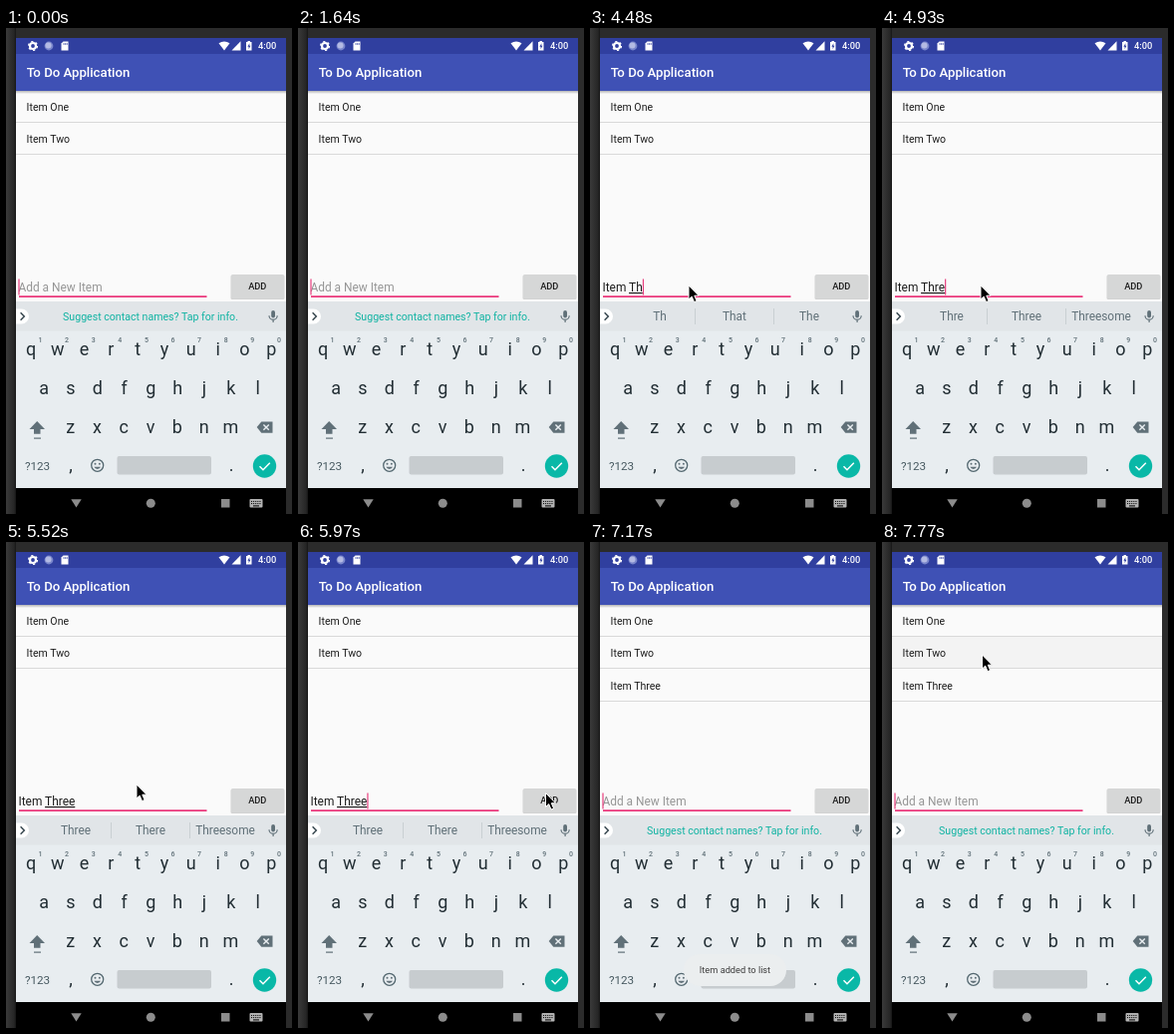
Animation of 287x487 px, one loop 8 s. Source, as an HTML page:

```html
<!DOCTYPE html>
<html lang="en">
<head>
<meta charset="utf-8">
<title>To Do Application</title>
<style>
  html, body { margin: 0; width: 100%; height: 100%; overflow: hidden; background: #2b2b2b; }
  svg { display: block; width: 287px; height: 487px; font-family: Roboto, sans-serif; }
  text { white-space: pre; }
  .mid { text-anchor: middle; }
  .medium { font-weight: 500; }
  .item { font-size: 10.55px; fill: #1c1c1c; }
  .field { font-size: 11.9px; }
  .word { font-size: 11.87px; fill: #607078; }
  .key { font-size: 18px; fill: #222e34; }
  .digit { font-size: 7px; fill: #607078; font-weight: 500; }
  .composing { text-decoration: underline; text-decoration-thickness: 1px; }
</style>
</head>
<body>
<svg viewBox="0 0 287 487">
  <defs>
    <linearGradient id="bezel"><stop stop-color="#3a3a3a"/><stop offset=".8" stop-color="#262626"/><stop offset="1" stop-color="#161616"/></linearGradient>
    <linearGradient id="shade" x2="0" y2="1"><stop stop-color="#000" stop-opacity=".28"/><stop offset="1" stop-color="#000" stop-opacity="0"/></linearGradient>
  </defs>

  <rect width="287" height="487" fill="#2b2b2b"/>
  <rect width="10" height="487" fill="url(#bezel)"/>
  <rect x="10" y="10" width="271" height="477" fill="#fafafa"/>

  <!-- status bar and title -->
  <rect x="10" y="10" width="271" height="16" fill="#303f9f"/>
  <rect x="10" y="26" width="271" height="37" fill="#3f51b5"/>
  <rect x="10" y="63" width="271" height="3" fill="url(#shade)"/>
  <g fill="#fff">
    <circle cx="27" cy="18" r="3" fill="none" stroke="#fff" stroke-width="2.2"/>
    <circle cx="27" cy="18" r="4.5" fill="none" stroke="#fff" stroke-width="1.2" stroke-dasharray="2.2 2.51"/>
    <circle cx="43" cy="18" r="4.4" fill="#7986cb"/>
    <circle cx="42.5" cy="17.6" r="3" fill="#b4bbe3"/>
    <path d="M57.5 13.5H62.5V22.5H55.5V15.5Z"/>
    <path d="M58 15v2M59.7 15v2M61.2 15v2" stroke="#303f9f" stroke-width=".7"/>
    <path d="M213.5 15.3Q219 11.6 224.5 15.3L219 22.5Z"/>
    <path d="M235.5 13.3V22.5H226.5Z"/>
    <path d="M242.5 13H245V14H246.5V22.5H241V14H242.5Z"/>
    <path d="M244.4 15.3L242.4 18.7H243.6V21.2L245.4 17.8H244.3Z" fill="#303f9f"/>
    <text class="medium" x="253" y="21.4" font-size="9.3">4:00</text>
    <text class="medium" x="20.7" y="49.3" font-size="13.2">To Do Application</text>
  </g>

  <!-- list -->
  <rect id="hover" x="10" y="95" width="271" height="32" fill="#f3f3f3"/>
  <g id="list"></g>

  <!-- input row -->
  <rect x="13" y="268.3" width="188.5" height="1.7" fill="#ea3378"/>
  <text id="hint" class="field" x="12.5" y="264" fill="#969696">Add a New Item</text>
  <text id="entry" class="field" x="12.5" y="264" fill="#1c1c1c">Item <tspan id="typed" class="composing"></tspan></text>
  <rect id="caret" y="251.5" width="1.2" height="16" fill="#e8407f"/>
  <rect x="225.5" y="247.5" width="54" height="24.6" rx="1.5" fill="#000" opacity=".16"/>
  <rect id="button" x="226" y="247" width="53" height="24" rx="1.5"/>
  <text class="mid medium" x="252.3" y="262.2" font-size="9.25" fill="#1c1c1c">ADD</text>

  <!-- suggestions -->
  <rect x="10" y="274" width="271" height="187" fill="#e8edf0"/>
  <rect x="10" y="274" width="271" height="29.5" fill="#e1e5e8"/>
  <path d="M10 281.5H15.5A7.5 7.5 0 0 1 15.5 296.5H10Z" fill="#fff"/>
  <path d="M14.6 285.3L18.3 289L14.6 292.7" fill="none" stroke="#37474f" stroke-width="1.5"/>
  <text id="tip" class="mid" x="145" y="293" font-size="10.6" fill="#0fb3a2">Suggest contact names? Tap for info.</text>
  <g id="words">
    <path d="M105.5 281V297M184.5 281V297" stroke="#c9cfd2"/>
    <text class="mid word" x="70" y="293.3"></text>
    <text class="mid word" x="145" y="293.3"></text>
    <text class="mid word" x="220" y="293.3"></text>
  </g>
  <g fill="#607078">
    <rect x="266.2" y="283" width="3.8" height="7.5" rx="1.9"/>
    <path d="M264 288.3A4.1 4.1 0 0 0 272.2 288.3M268.1 292.4V295" fill="none" stroke="#607078" stroke-width="1.2"/>
  </g>

  <!-- keyboard -->
  <g id="keys"></g>
  <g fill="#607078">
    <path d="M31.2 394L39 402H34.5V406.7H28V402H23.5Z"/>
    <rect x="28" y="410.5" width="7" height="1.2"/>
    <path d="M256.3 394.5H267.5V405.7H256.3L251.7 400.1Z"/>
    <path d="M258.4 397.4L263.8 402.8M263.8 397.4L258.4 402.8" stroke="#e8edf0" stroke-width="1.4"/>
    <circle cx="91.7" cy="438.3" r="6" fill="none" stroke="#546870" stroke-width="1.3"/>
    <circle cx="89.5" cy="436.7" r="1"/><circle cx="93.9" cy="436.7" r="1"/>
    <path d="M88.4 439.8H95A3.5 3.2 0 0 1 88.4 439.8Z"/>
  </g>
  <text class="mid" x="31.5" y="442.6" font-size="11.7" fill="#46585f">?123</text>
  <text class="mid key" x="65" y="443.5">,</text>
  <text class="mid key" x="226" y="443.5">.</text>
  <rect x="111.5" y="429" width="94.5" height="18.5" rx="2" fill="#c7cccf"/>
  <circle cx="259.5" cy="439" r="11.7" fill="#09b8a7"/>
  <path d="M254.5 439.3L258 442.8L264.8 435.8" fill="none" stroke="#fff" stroke-width="1.5"/>

  <!-- navigation bar -->
  <rect x="10" y="461" width="271" height="26" fill="#000"/>
  <g fill="#8c8c8c">
    <path d="M65.3 472.3H75.7L70.5 480.6Z"/>
    <circle cx="145.3" cy="476.3" r="4.5"/>
    <rect x="216" y="472" width="8.5" height="8.5"/>
    <rect x="244.5" y="472" width="13" height="8.5" rx="1" fill="#b4b4b4"/>
    <path d="M246 474.4H256.5M246 476.6H256.5" stroke="#000" stroke-width="1" stroke-dasharray="1.1 1"/>
    <path d="M248 478.9H254" stroke="#000"/>
  </g>

  <g id="toast">
    <rect x="94" y="413" width="103" height="32" rx="16" fill="#ebeeef"/>
    <text class="mid" x="145.5" y="432.3" font-size="9.23" fill="#3c3c3c">Item added to list</text>
  </g>
  <path id="mouse" d="M0 0V14L3.2 11.1L5.5 16.6L8.1 15.5L5.8 10.2H10Z" fill="#000" stroke="#fff" stroke-width="1"/>
</svg>
<script>
const LOOP = 8000;
const $ = id => document.getElementById(id);

function add(parent, tag, attrs, text = '') {
  const el = document.createElementNS('http://www.w3.org/2000/svg', tag);
  for (const k in attrs) el.setAttribute(k, attrs[k]);
  el.textContent = text;
  return parent.appendChild(el);
}

const rows = ['One', 'Two', 'Three'].map((name, i) => {
  const g = add($('list'), 'g', {});
  const y = 32.4 * i;
  add(g, 'text', { class: 'item', x: 20.6, y: 82.8 + y }, 'Item ' + name);
  add(g, 'rect', { x: 10, y: Math.round(94 + y), width: 271, height: 1, fill: '#d9d9d9' });
  return g;
});

[['qwertyuiop', 25, 328], ['asdfghjkl', 38.2, 367], ['zxcvbnm', 64.7, 406]].forEach(([letters, x, y], r) => {
  [...letters].forEach((c, i) => {
    add($('keys'), 'text', { class: 'mid key', x: x + 26.8 * i, y }, c);
    if (r === 0) add($('keys'), 'text', { class: 'mid digit', x: 34.5 + 26.6 * i, y: 315 }, (i + 1) % 10);
  });
});

// Each track is a list of [start time, value], held until the next start.
const tracks = {
  caret: [[0, 1], [150, 0], [740, 1], [1190, 0], [1640, 1], [2240, 0], [2690, 1], [3130, 0], [3730, 1], [4180, 0],
    [4480, 1], [5520, 0], [5970, 1], [6720, 0], [7170, 1], [7630, 0], [7770, 1]],
  typed: [[0, ''], [4480, 'Th'], [4630, 'Thr'], [4930, 'Thre'], [5080, 'Three'], [6120, '']],
  mouse: [[0, null], [4480, [99, 258]], [5520, [131, 243]], [5670, [174, 246]], [5820, [221, 250]],
    [5970, [248.5, 251.5]], [6570, null], [7770, [100.5, 113]]],
  button: [[0, '#d6d7d7'], [6120, '#c2c3c3'], [6420, '#d6d7d7']],
  items: [[0, 2], [6120, 3]],
  toast: [[0, 0], [6270, .5], [6420, .9], [6570, 1], [7630, .4], [7770, 0]],
  hover: [[0, 0], [7770, 1]]
};

const suggestions = {
  Th: ['Th', 'That', 'The'],
  Thr: ['Thr', 'Three', 'Throw'],
  Thre: ['Thre', 'Three', 'Threesome'],
  Three: ['Three', 'There', 'Threesome']
};

const at = (track, t) => track.findLast(([start]) => start <= t)[1];
const show = (el, on) => { el.style.display = on ? '' : 'none'; };
const wordEls = $('words').querySelectorAll('text');

function draw(t) {
  const s = {};
  for (const k in tracks) s[k] = at(tracks[k], t);

  show($('hint'), !s.typed);
  show($('tip'), !s.typed);
  show($('entry'), s.typed);
  show($('words'), s.typed);
  if (s.typed) {
    $('typed').textContent = s.typed;
    wordEls.forEach((el, i) => { el.textContent = suggestions[s.typed][i]; });
  }

  show($('caret'), s.caret);
  $('caret').setAttribute('x', s.typed ? 12.6 + $('entry').getComputedTextLength() : 12.4);
  rows.forEach((row, i) => show(row, i < s.items));
  $('button').setAttribute('fill', s.button);
  $('toast').setAttribute('opacity', s.toast);
  show($('hover'), s.hover);
  show($('mouse'), s.mouse);
  if (s.mouse) $('mouse').setAttribute('transform', `translate(${s.mouse})`);
}

const begin = performance.now();
function tick() {
  draw((performance.now() - begin) % LOOP);
  requestAnimationFrame(tick);
}
tick();
</script>
</body>
</html>
```
